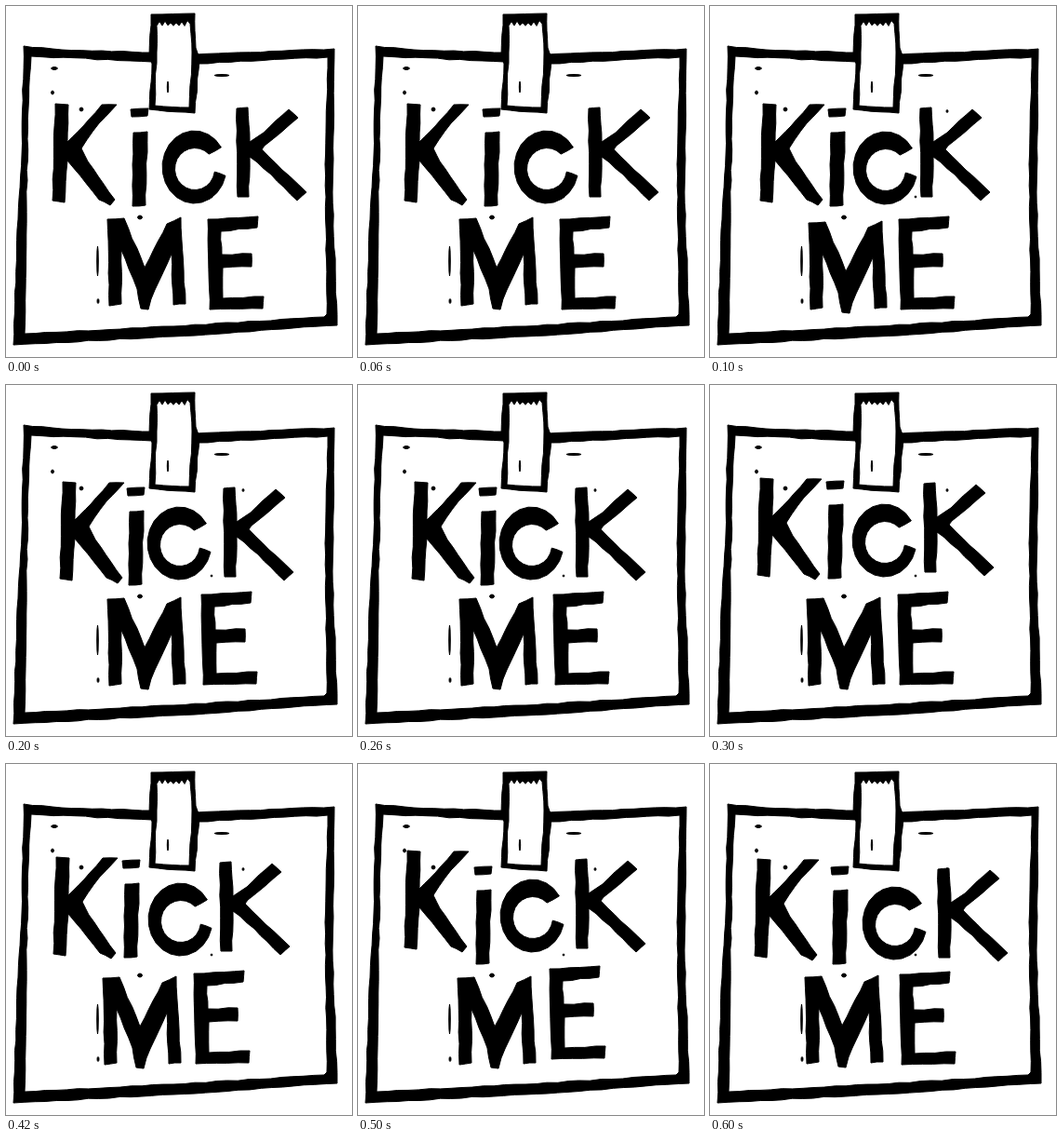
Animation of 372 by 377 pixels, one loop 700 ms. Source, as an HTML page:

```html
<!DOCTYPE html>
<html lang="en">
<head>
<meta charset="utf-8">
<title>Kick me</title>
<style>
html, body { margin: 0; width: 100%; height: 100%; overflow: hidden; background: #fff; }
svg { display: block; width: 372px; height: 377px; }
path { stroke: #000; stroke-width: 1; stroke-linejoin: round; }
.paper { fill: #fff; }
</style>
</head>
<body>
<svg viewBox="0 0 372 377" role="img" aria-label="Kick me"></svg>
<script>
const LOOP = 700;
const TIMES = [0, 100, 200, 300, 500, 600];
const svg = document.querySelector("svg");

let seed = 7;
const random = () => (seed = seed * 16807 % 2147483647) / 2147483647;
const jitter = () => (random() - 0.5) * 1.2;

const parse = text => text.split(" ").map(p => p.split(",").map(Number));

// Splits each edge into short pieces and shakes them, as if cut by hand.
function carve(corners) {
  const out = [];
  corners.forEach(([x, y], i) => {
    const [u, v] = corners[(i + 1) % corners.length];
    const n = Math.ceil(Math.hypot(u - x, v - y) / 12);
    out.push([x, y]);
    for (let k = 1; k < n; k++) {
      out.push([x + (u - x) * k / n + jitter(), y + (v - y) * k / n + jitter()]);
    }
  });
  return "M" + out.map(p => p.map(c => c.toFixed(1)).join()).join("L") + "Z";
}

function draw(d, name = "ink") {
  const path = document.createElementNS("http://www.w3.org/2000/svg", "path");
  path.setAttribute("class", name);
  path.setAttribute("d", d);
  svg.append(path);
  return path;
}

function arc(cx, cy, rx, ry, from, to, steps = 20) {
  return Array.from({ length: steps + 1 }, (_, i) => {
    const a = (from + (to - from) * i / steps) * Math.PI / 180;
    return [cx + rx * Math.cos(a), cy + ry * Math.sin(a)];
  });
}

// note
draw(carve(parse("19,43 60,47 157,50 205,52 353,46 351,200 356,343 180,355 8,364 12,240 17,160")));
draw(carve(parse("27,54 157,60 206,62 346,55 343,170 345,331 342,334 180,344 20,352 22,210 24,110")), "paper");

// tape with a torn top edge
const torn = Array.from({ length: 13 }, (_, i) => [162 + i * 3, (i % 2 ? 15 : 19) + random() * 3]);
draw(carve(parse("156,9 203,8 204,45 208,56 203,115 154,111 157,62 154,54")));
draw(carve([...torn, ...parse("200,50 197,109 160,107 162,50")]), "paper");

// specks: centre and radii
for (const e of [
  [52, 67, 3.5, 1.5], [50, 93, 1.5, 2], [81, 111, 2, 2], [232, 74.5, 8, 1], [174, 87, 0.7, 6],
  [255, 113, 1, 1.5], [221, 205, 1, 1], [144, 227, 2.5, 2], [98.5, 274, 0.8, 16], [99, 317, 1, 2.5]
]) draw("M" + arc(...e, 0, 360, 8).join("L") + "Z");

const K1 = carve(parse("53,105 67,106 66,146 83,129 103,106 119,106 100,126 81,153 88,167 117,208 112,214 100,208 66,166 63,211 50,209"));
const I = carve(parse("134,111 153,110 152,118 135,119")) + carve(parse("137,136 152,135 150,214 136,215"));
const C = carve([...arc(202.5, 173, 34.5, 39, 14, 327), ...arc(203, 175, 21.5, 22.5, 315, 8)]);
const K2 = carve(parse("248,110 260,109 262,146 277,136 304,111 314,120 278,150 275,154 297,176 323,200 313,209 285,181 262,162 261,205 249,205"));
const M = carve(parse("109,229 127,228 149,281 173,234 188,227 193,320 180,321 178,266 160,305 153,326 145,325 141,304 124,262 124,320 111,322"));
const E = carve(parse("217,229 271,226 270,238 231,242 232,267 264,266 264,280 233,281 233,314 277,312 276,325 219,326"));

// Each letter hops to a new spot at each of TIMES.
function hop(d, spots) {
  const frames = parse(spots).map(([x, y], i) => ({
    offset: TIMES[i] / LOOP,
    transform: `translate(${x}px, ${y}px)`,
    easing: "step-end"
  }));
  frames.push({ offset: 1, transform: frames[0].transform });
  draw(d).animate(frames, { duration: LOOP, iterations: Infinity });
}

hop(K1, "0,0 4,0 8,-1 1,-5 0,-12 -2,-3");
hop(I, "0,0 -7,0 -4,0 -9,-7 -9,0 -4,0");
hop(C, "0,0 -14,1 -16,-3 -15,-6 -15,-10 -4,-2");
hop(K2, "0,0 -22,0 -14,1 -18,-4 -14,-7 -3,3");
hop(M, "0,0 -3,4 0,1 -5,1 -2,1 -7,0");
hop(E, "0,0 -14,0 -7,-4 -15,-4 -11,-9 -13,-3");
</script>
</body>
</html>
```
